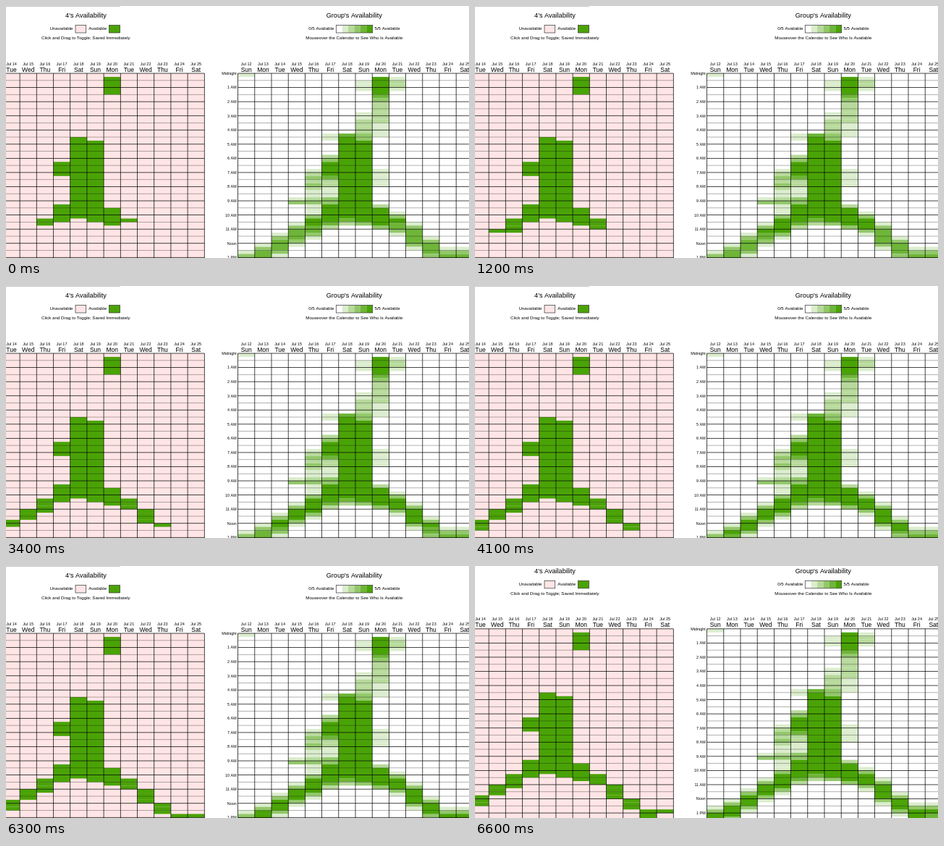
An HTML page with a canvas for the animation above (6700 ms loop, 640x348 px).

```html
<!DOCTYPE html>
<html lang="en">
<head>
<meta charset="utf-8">
<title>Availability</title>
<style>
html, body { margin: 0; width: 100%; height: 100%; overflow: hidden; background: #fff; }
canvas { display: block; }
</style>
</head>
<body>
<canvas id="stage" width="640" height="348"></canvas>
<script>
const ctx = document.getElementById('stage').getContext('2d');
const LOOP = 6700, COLS = 14, ROWS = 55;
const COL_W = 23.2, ROW_H = 4.89, TOP = 93;
const LEFT_X = -50.5, RIGHT_X = 320.6;
const PINK = '#ffe5e5', GREEN = [74, 163, 6];
const DAYS = ['Sun', 'Mon', 'Tue', 'Wed', 'Thu', 'Fri', 'Sat'];

// Rows are quarter hours. Blocks: column, first row, end row.
const fixed = [[8, 1, 6], [6, 18, 41], [7, 19, 42], [5, 25, 29], [5, 37, 42], [8, 38, 43]];

// The two legs are painted one cell at a time, at the given times.
const legs = [
  { blocks: [[4, 41, 45], [3, 44, 47], [2, 47, 50], [1, 50, 53], [0, 52, 54]],
    times: [0, 0, 300, 700, 1100, 1700, 2200, 2600, 3100, 3600, 4000, 4400, 5000, 5500, 6000] },
  { blocks: [[9, 41, 44], [10, 44, 48], [11, 48, 51], [12, 51, 54], [13, 51, 54]],
    times: [0, 500, 800, 1400, 2000, 2500, 2900, 3300, 3800, 4200, 4700, 5200, 5700, 6000] }
];

// Partial group availability: column, first row, one level per row.
const partial = [
  [0, 0, '1'], [3, 35, '13'], [4, 27, '123232112311'],
  [5, 17, '11000023'], [5, 29, '42211133'], [5, 42, '42'],
  [6, 17, '4'], [6, 41, '42'],
  [7, 2, '111'], [7, 11, '11222233'], [7, 42, '3'],
  [8, 6, '432222221111'], [8, 27, '11111'], [8, 37, '2'], [8, 43, '3'],
  [9, 1, '1221']
];

const shade = level =>
  `rgb(${GREEN.map(c => Math.round(255 + (c - 255) * level / 5)).join()})`;

function rect(x, y, w, h, color) {
  ctx.fillStyle = color;
  ctx.fillRect(x, y, w, h);
}

function text(str, x, y, size, align = 'center') {
  ctx.font = `${size}px "Liberation Sans", Arial, sans-serif`;
  ctx.textAlign = align;
  ctx.fillStyle = '#000';
  ctx.fillText(str, x, y);
}

function block(x0, col, from, to, color) {
  rect(x0 + col * COL_W, TOP + from * ROW_H, COL_W, (to - from) * ROW_H, color);
}

function frame(x, y, w, h) {
  ctx.strokeStyle = '#333';
  ctx.lineWidth = 0.7;
  ctx.strokeRect(x, y, w, h);
}

function gridLines(x0) {
  const width = COLS * COL_W;
  for (let row = 0; row < ROWS; row += 2) {
    const hour = row % 4 === 0;
    rect(x0, TOP + row * ROW_H - 0.4, width, 0.8, hour ? 'rgba(0,0,0,.9)' : 'rgba(0,0,0,.38)');
  }
  for (let col = 0; col <= COLS; col++)
    rect(x0 + col * COL_W - 0.4, TOP, 0.8, ROWS * ROW_H, 'rgba(0,0,0,.9)');
  for (let col = 0; col < COLS; col++) {
    const x = x0 + (col + 0.5) * COL_W;
    text('Jul ' + (12 + col), x, 81.5, 5.5);
    text(DAYS[col % 7], x, 90.6, 8.5);
  }
}

function drawLegs(t) {
  for (const { blocks, times } of legs) {
    let n = 0;
    for (const [col, from, to] of blocks) {
      block(RIGHT_X, col, from - 2, from - 1, shade(1));
      block(RIGHT_X, col, from - 1, from, shade(3));
      block(RIGHT_X, col, from, to, shade(4));
      block(RIGHT_X, col, to, to + 1, shade(3));
      block(RIGHT_X, col, to + 1, to + 2, shade(1));
      for (let row = from; row < to; row++)
        if (t >= times[n++])
          for (const x0 of [LEFT_X, RIGHT_X]) block(x0, col, row, row + 1, shade(5));
    }
  }
}

function drawHeader() {
  rect(0, 0, 158, 0.8, '#bbb');
  text("4's Availability", 110.5, 16.2, 9.15);
  text('Unavailable', 92.5, 33, 6.15, 'right');
  rect(96, 26.5, 14.7, 10.5, PINK);
  frame(96, 26.5, 14.7, 10.5);
  text('Available', 114.3, 33, 6.15, 'left');
  rect(142.5, 26.5, 15, 10.5, shade(5));
  frame(142.5, 26.5, 15, 10.5);
  text('Click and Drag to Toggle; Saved Immediately', 110.3, 46, 6.15);

  text("Group's Availability", 481.3, 16.2, 9.15);
  text('0/5 Available', 453.3, 33, 6.15, 'right');
  for (let i = 0; i < 6; i++) rect(456.3 + i * 8.4, 26.5, 8.4, 10.5, shade(i));
  frame(456.3, 26.5, 50.4, 10.5);
  text('5/5 Available', 509.5, 33, 6.15, 'left');
  text('Mouseover the Calendar to See Who Is Available', 481.3, 46, 6.15);
}

function draw(now) {
  const t = Math.floor(now % LOOP / 100) * 100;
  const scroll = 6.2 * Math.min(1, Math.max(0, (t - 6300) / 200));
  ctx.setTransform(1, 0, 0, 1, 0, 0);
  rect(0, 0, 640, 348, '#fff');
  ctx.translate(0, -scroll);

  drawHeader();
  block(LEFT_X, 0, 0, ROWS, PINK);
  rect(LEFT_X, TOP, COLS * COL_W, ROWS * ROW_H, PINK);
  for (const [col, from, levels] of partial)
    [...levels].forEach((level, i) => block(RIGHT_X, col, from + i, from + i + 1, shade(+level)));
  drawLegs(t);
  for (const [col, from, to] of fixed)
    for (const x0 of [LEFT_X, RIGHT_X]) block(x0, col, from, to, shade(5));
  gridLines(LEFT_X);
  gridLines(RIGHT_X);

  for (let hour = 0; hour < 14; hour++) {
    const label = hour === 0 ? 'Midnight' : hour === 12 ? 'Noon'
      : (hour % 12) + (hour < 12 ? ' AM' : ' PM');
    text(label, 318.7, TOP + hour * 4 * ROW_H + 1.9, 5.4, 'right');
  }
}

const start = performance.now();
function tick() {
  draw(performance.now() - start);
  requestAnimationFrame(tick);
}
tick();
</script>
</body>
</html>
```
